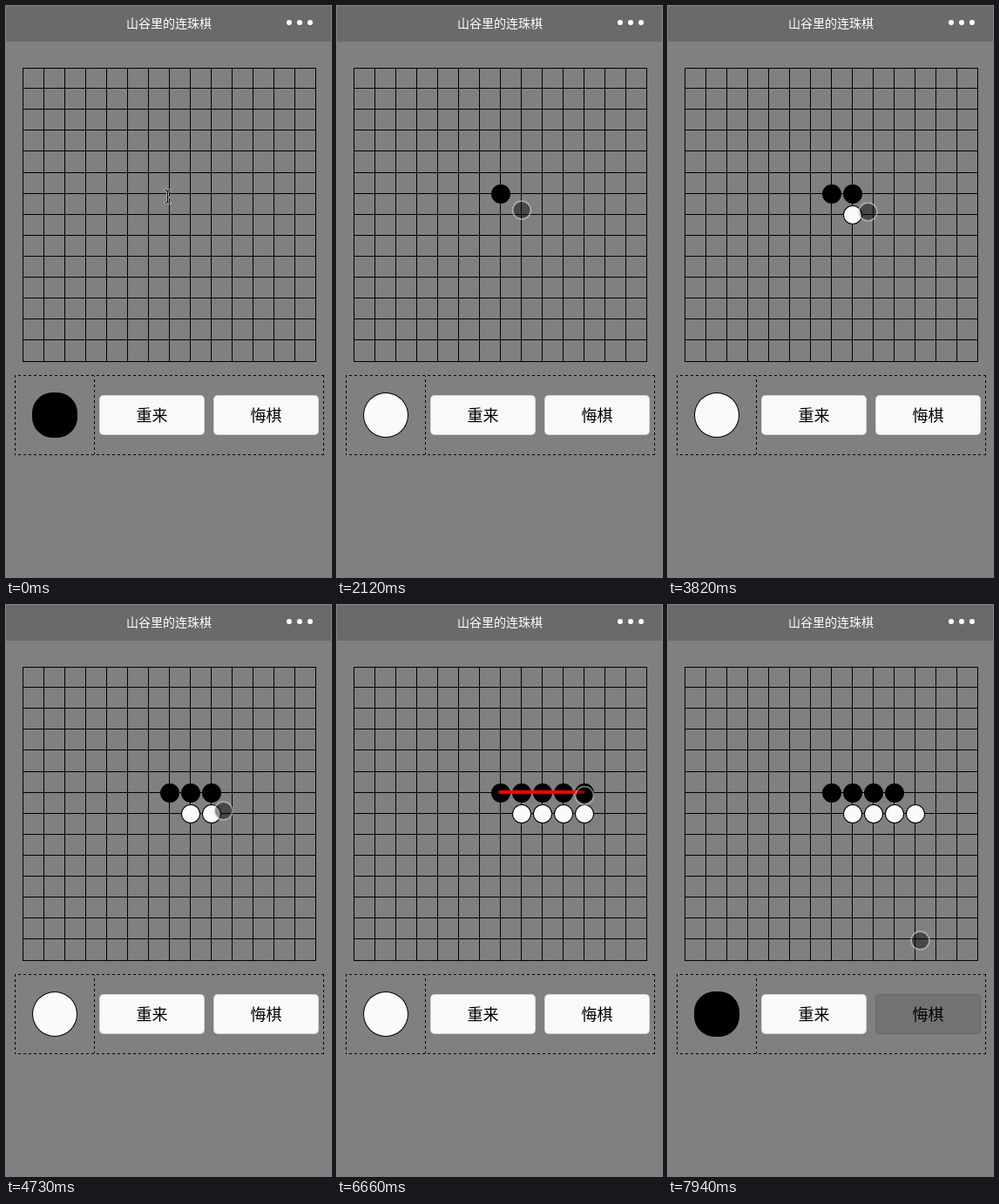
An HTML page with a canvas for the animation above (8000 ms loop, 373 by 656 pixels).

```html
<!DOCTYPE html>
<html lang="zh-CN">
<head>
<meta charset="utf-8">
<title>山谷里的连珠棋</title>
<style>
html, body { margin: 0; width: 100%; height: 100%; overflow: hidden; background: #808080; }
canvas { display: block; width: 373px; height: 656px; }
</style>
</head>
<body>
<canvas id="stage"></canvas>
<script>
const W = 373, H = 656, LOOP = 8000;
const FONT = '"Noto Sans CJK SC", "Noto Sans CJK", sans-serif';
const canvas = document.getElementById('stage');
const ctx = canvas.getContext('2d');
const ratio = window.devicePixelRatio || 1;
canvas.width = W * ratio;
canvas.height = H * ratio;
ctx.scale(ratio, ratio);

const taps = [1020, 2820, 3350, 4000, 4400, 4970, 5320, 6190, 6660];
const WIN = taps[8], PRESS = 7700, UNDO = 7860, POINTER = 780;

const colX = i => 19 + 24 * i;
const rowY = i => Math.max(71, Math.floor(70.55 + 24.105 * i));

// Black fills one row from the left, white the row below, one column ahead
const stoneAt = n => [colX(7 + Math.ceil(n / 2)) + 1, rowY(6 + n % 2) + 1];

// Pointer glides: start, duration, end x, end y
const glides = [
  [1250, 450, 241.5, 231],
  [1700, 420, 212, 234.5],
  [2410, 110, 207.5, 232.5],
  [3350, 180, 227, 233],
  [3760, 60, 229.5, 236.5],
  [4400, 330, 249.5, 236.5],
  [5320, 400, 286.5, 244.5],
  [5890, 120, 284.5, 242.5],
  [6780, 520, 308.5, 491],
  [7300, 220, 300, 482],
  [7800, 140, 289.5, 385.5]
];
// After each white stone the pointer goes up to the next black spot
for (let n = 1; n < 8; n += 2) {
  const [x, y] = stoneAt(n + 1);
  glides.push([taps[n], 200, x, y + 3]);
}
glides.sort((a, b) => a[0] - b[0]);

function pointerAt(t) {
  let x = 185.5, y = 219.5;
  for (const [from, span, toX, toY] of glides) {
    if (t < from) break;
    const p = Math.min(1, (t - from) / span);
    const ease = p * p * (3 - 2 * p);
    x += (toX - x) * ease;
    y += (toY - y) * ease;
  }
  return [x, y];
}

function disc(x, y, r, fill) {
  ctx.beginPath();
  ctx.arc(x, y, r, 0, Math.PI * 2);
  ctx.fillStyle = fill;
  ctx.fill();
}

function box(x, y, w, h, r, fill) {
  ctx.beginPath();
  ctx.roundRect(x, y, w, h, r);
  ctx.fillStyle = fill;
  ctx.fill();
}

function line(x1, y1, x2, y2, color = '#000', width = 1) {
  ctx.beginPath();
  ctx.moveTo(x1, y1);
  ctx.lineTo(x2, y2);
  ctx.strokeStyle = color;
  ctx.lineWidth = width;
  ctx.stroke();
}

function label(text, x, y, font) {
  ctx.font = font + ' ' + FONT;
  ctx.textAlign = 'center';
  ctx.fillText(text, x, y);
}

function header() {
  ctx.fillStyle = '#6a6a6a';
  ctx.fillRect(0, 0, W, 41);
  ctx.fillStyle = '#fff';
  label('山谷里的连珠棋', 187, 25, '500 14px');
  for (const x of [325, 337, 349]) disc(x, 19, 3, '#fff');
}

function board() {
  for (let i = 0; i < 15; i++) {
    line(colX(i) + 0.5, 71, colX(i) + 0.5, 409);
    line(19, rowY(i) + 0.5, 356, rowY(i) + 0.5);
  }
}

function stone(x, y, r, white) {
  disc(x, y, r, '#000');
  if (white) disc(x, y, r - 1, '#fafafa');
}

function button(text, x, pressed) {
  box(x, 447, 121, 46, 5, pressed ? '#666' : '#d4d4d4');
  box(x + 1, 448, 119, 44, 4, pressed ? '#727272' : '#f9f9f9');
  ctx.fillStyle = '#000';
  label(text, x + 60.5, 476.5, '18px');
}

function dashes() {
  ctx.setLineDash([3, 3]);
  ctx.lineDashOffset = 3;
  for (const y of [424.5, 515.5]) line(11, y, 364, y);
  ctx.lineDashOffset = 1;
  for (const x of [10.5, 364.5]) line(x, 425, x, 515);
  ctx.lineDashOffset = 2;
  line(101.5, 425, 101.5, 515);
  ctx.setLineDash([]);
  ctx.fillStyle = '#000';
  for (const x of [10, 364]) for (const y of [424, 515]) ctx.fillRect(x, y, 1, 1);
}

function panel(white, pressed) {
  dashes();
  if (white) stone(56, 470, 26, true);
  else box(30, 444, 52, 52, 23.5, '#000');
  button('重来', 107, false);
  button('悔棋', 238, pressed);
}

function textCursor(x, y) {
  ctx.lineCap = 'round';
  for (const [color, width] of [['#c8c8c8', 2.6], ['#111', 1.1]]) {
    ctx.beginPath();
    for (const s of [-1, 1]) {
      ctx.moveTo(x - 3, y + 7.5 * s);
      ctx.quadraticCurveTo(x, y + 7.5 * s, x, y + 5 * s);
      ctx.quadraticCurveTo(x, y + 7.5 * s, x + 3, y + 7.5 * s);
    }
    ctx.moveTo(x, y - 5);
    ctx.lineTo(x, y + 5);
    ctx.moveTo(x - 1.5, y + 1);
    ctx.lineTo(x + 1.5, y + 1);
    ctx.strokeStyle = color;
    ctx.lineWidth = width;
    ctx.stroke();
  }
  ctx.lineCap = 'butt';
}

function touch(x, y) {
  disc(x, y, 9.7, 'rgba(0,0,0,.44)');
  ctx.beginPath();
  ctx.arc(x, y, 10.4, 0, Math.PI * 2);
  ctx.strokeStyle = 'rgba(205,205,205,.55)';
  ctx.lineWidth = 1.7;
  ctx.stroke();
}

function draw(t) {
  let count = taps.filter(tap => t >= tap).length;
  if (t >= UNDO) count--;
  ctx.fillStyle = '#808080';
  ctx.fillRect(0, 0, W, H);
  header();
  board();
  for (let n = 0; n < count; n++) stone(...stoneAt(n), 11, n % 2);
  if (t >= WIN && t < UNDO) line(186, 215, 284, 215, '#f00', 4);
  panel(count % 2, t >= PRESS);
  if (t < POINTER) textCursor(185.5, 219);
  else touch(...pointerAt(t));
}

function frame() {
  draw(performance.now() % LOOP);
  requestAnimationFrame(frame);
}
frame();
</script>
</body>
</html>
```
